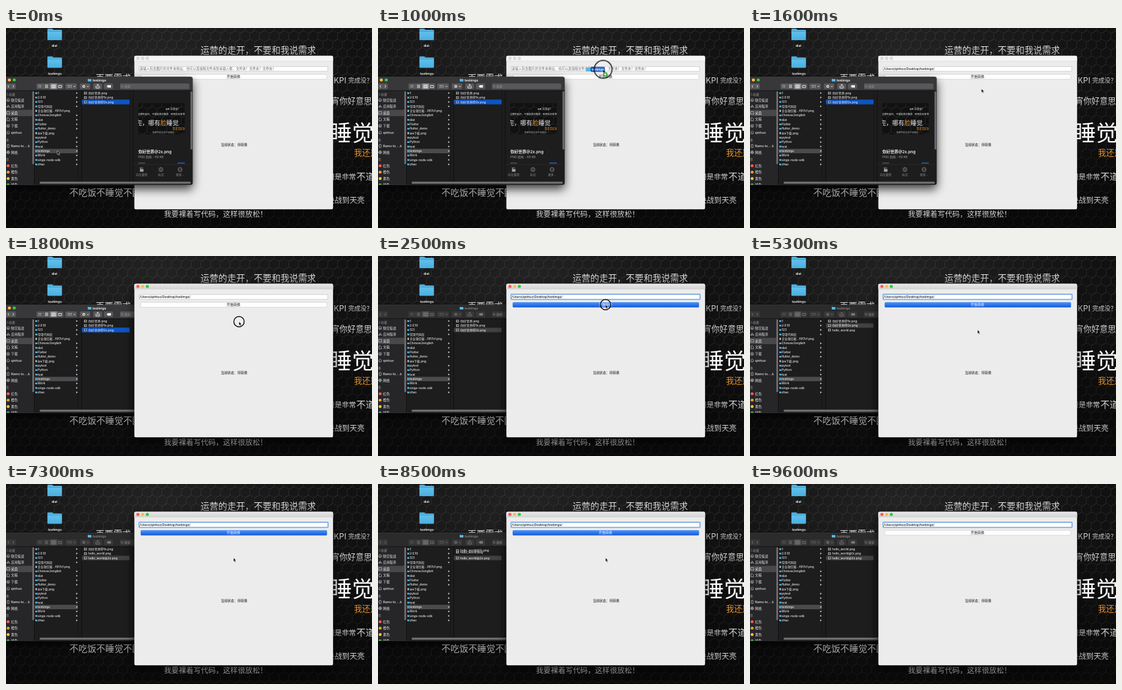
Recreate the animation shown at these times as an HTML page. Size 600x329 px, loop 10000 ms.

```html
<!DOCTYPE html>
<html lang="zh-CN">
<head>
<meta charset="utf-8">
<title>Rename tool demo</title>
<style>
html, body { margin: 0; width: 100%; height: 100%; overflow: hidden; background: #0a0a0a; }
#stage { position: absolute; left: 0; top: 0; width: 600px; height: 329px; overflow: hidden; }
#stage > svg { position: absolute; left: 0; top: 0; width: 600px; height: 329px; }
text { font-family: Inter, "Noto Sans CJK SC", "Noto Sans CJK", sans-serif; white-space: pre; }
#wall text { fill: url(#steel); font-weight: 350; }
#slogans text { font-family: "Noto Sans CJK TC", "Noto Sans CJK", sans-serif; }
#wall .amber { fill: #e0902a; }
#wall .lit { fill: #fff; }
#desk text { font-size: 5.3px; text-anchor: middle; }
#wall #desk text { fill: #fff; font-weight: 600; }
#finder { z-index: 2; }
#finder text { fill: #ececec; font-size: 5px; font-weight: 500; }
#finder .soft { fill: #8f8f91; }
#app { z-index: 1; }
#app text { font-size: 5.45px; font-weight: 500; fill: #111; }
#app .hint { fill: #666; }
#app .white { fill: #fff; }
#pointer { z-index: 5; }
.mid { text-anchor: middle; }
.deep { filter: drop-shadow(0 7px 8px rgba(0, 0, 0, .75)); }

/* hard switches */
#app, .till12, .from12, .till19, .from17, .from19, .busy, .drag, .ring,
.was42, .now42, .was62, .now62, .was85, .now85 { animation: 10s step-end infinite; }
#app { animation-name: front; }
.till12 { animation-name: till12; }
.from12 { animation-name: from12; }
.from17 { animation-name: from17; }
.till19 { animation-name: till19; }
.from19 { animation-name: from19; }
.busy { animation-name: busy; }
.drag { animation-name: drag; }
.ring { animation-name: ring; }
.was42 { animation-name: was42; }
.now42 { animation-name: now42; }
.was62 { animation-name: was62; }
.now62 { animation-name: now62; }
.was85 { animation-name: was85; }
.now85 { animation-name: now85; }
@keyframes front { 0% { z-index: 1 } 17%, 100% { z-index: 3 } }
@keyframes till12 { 0% { opacity: 1 } 12%, 100% { opacity: 0 } }
@keyframes from12 { 0% { opacity: 0 } 12%, 100% { opacity: 1 } }
@keyframes from17 { 0% { opacity: 0 } 17%, 100% { opacity: 1 } }
@keyframes till19 { 0% { opacity: 1 } 19%, 100% { opacity: 0 } }
@keyframes from19 { 0% { opacity: 0 } 19%, 100% { opacity: 1 } }
@keyframes busy { 0% { opacity: 0 } 25% { opacity: 1 } 89%, 100% { opacity: 0 } }
@keyframes drag { 0% { opacity: 0 } 1% { opacity: 1 } 11%, 100% { opacity: 0 } }
@keyframes was42 { 0% { opacity: 1 } 42%, 100% { opacity: 0 } }
@keyframes now42 { 0% { opacity: 0 } 42%, 100% { opacity: 1 } }
@keyframes was62 { 0% { opacity: 1 } 62%, 100% { opacity: 0 } }
@keyframes now62 { 0% { opacity: 0 } 62%, 100% { opacity: 1 } }
@keyframes was85 { 0% { opacity: 1 } 85%, 100% { opacity: 0 } }
@keyframes now85 { 0% { opacity: 0 } 85%, 100% { opacity: 1 } }
@keyframes ring {
  0% { opacity: 0; transform: scale(1) }
  1% { opacity: 1; transform: scale(1.3) }
  2% { opacity: 1; transform: scale(1.72) }
  11% { opacity: 0; transform: scale(1) }
  17% { opacity: 1 }
  19% { opacity: 0 }
  25% { opacity: 1 }
  27%, 100% { opacity: 0; transform: scale(1) }
}

/* motion, ten steps per second */
#hand { animation: hand 10s steps(1) infinite; }
@keyframes hand {
  0% { transform: translate(84px, 202px) }
  1% { transform: translate(84px, 202px); animation-timing-function: steps(2) }
  3% { transform: translate(118px, 187px); animation-timing-function: steps(4) }
  7% { transform: translate(285px, 108px); animation-timing-function: steps(3) }
  10% { transform: translate(369px, 68px) }
  12% { transform: translate(369px, 68px); animation-timing-function: steps(5) }
  17% { transform: translate(382px, 108px) }
  19% { transform: translate(382px, 108px); animation-timing-function: steps(4) }
  23% { transform: translate(373px, 80px) }
  28% { transform: translate(373px, 80px); animation-timing-function: steps(5) }
  33% { transform: translate(373px, 121.5px) }
  88% { transform: translate(373px, 121.5px); animation-timing-function: steps(8) }
  96%, 100% { transform: translate(402px, 340px) }
}
#fileA, #fileB, #fileC { animation: 10s steps(3) infinite; }
#fileA { animation-name: fileA; }
#fileB { animation-name: fileB; }
#fileC { animation-name: fileC; }
@keyframes fileA {
  0%, 41% { transform: translateY(0) }
  44%, 61% { transform: translateY(14.66px) }
  64%, 84% { transform: translateY(7.33px) }
  87%, 100% { transform: translateY(0) }
}
@keyframes fileB {
  0%, 41% { transform: translateY(7.33px) }
  44%, 84% { transform: translateY(0) }
  87%, 100% { transform: translateY(7.33px) }
}
@keyframes fileC {
  0%, 41% { transform: translateY(14.66px) }
  44%, 61% { transform: translateY(7.33px) }
  64%, 100% { transform: translateY(14.66px) }
}
</style>
</head>
<body>
<div id="stage">

<svg id="wall" viewBox="0 0 600 329">
  <defs>
    <path id="comb" d="M8 0V4.6L0 9.2V18.5L8 23.1V27.7M8 4.6L16 9.2V18.5L8 23.1" fill="none"/>
    <pattern id="mesh" width="16" height="27.7" patternUnits="userSpaceOnUse">
      <rect width="16" height="27.7" fill="#111112"/>
      <use href="#comb" stroke="#2b2b2c" stroke-width="1.5"/>
      <use href="#comb" stroke="#050505" stroke-width=".8" transform="translate(.7 .8)"/>
    </pattern>
    <linearGradient id="steel" x2="0" y2="1"><stop offset=".2" stop-color="#eee"/><stop offset="1" stop-color="#a0a0a0"/></linearGradient>
    <linearGradient id="shade" x2="0" y2="1"><stop offset=".3" stop-color="#000" stop-opacity="0"/><stop offset="1" stop-color="#000" stop-opacity=".5"/></linearGradient>
    <radialGradient id="glow" gradientUnits="userSpaceOnUse" cx="250" cy="30" r="330"><stop stop-color="#777" stop-opacity=".17"/><stop offset="1" stop-color="#777" stop-opacity="0"/></radialGradient>
    <linearGradient id="folder" x2="0" y2="1"><stop stop-color="#3f9fd0"/><stop offset=".25" stop-color="#62c1ec"/><stop offset="1" stop-color="#4aaede"/></linearGradient>
    <symbol id="dir" viewBox="0 0 24 20"><path d="M0 2Q0 .5 1.5 .5H8L10 2.5H22.5Q24 2.5 24 4V18Q24 19.5 22.5 19.5H1.5Q0 19.5 0 18Z" fill="url(#folder)"/><path d="M0 5.2H24" stroke="#2f87b8" stroke-width=".7"/></symbol>
  </defs>
  <rect width="600" height="329" fill="url(#mesh)"/>
  <rect width="600" height="329" fill="url(#glow)"/>
  <rect width="600" height="329" fill="url(#shade)"/>
  <g id="slogans"></g>
  <g id="desk">
    <use href="#dir" x="67.5" y="0.5" width="24.5" height="20"/><text x="79.5" y="31">dist</text>
    <use href="#dir" x="67.5" y="46" width="24.5" height="20"/><text x="80" y="76.5">testimgs</text>
  </g>
</svg>

<svg id="finder" viewBox="0 0 600 329">
  <defs>
    <path id="shell" d="M-5 80.5H302.5Q306 80.5 306 84V254.5Q306 258 302.5 258H-5Z"/>
    <clipPath id="frame"><use href="#shell"/></clipPath>
    <clipPath id="thumb"><rect x="217" y="123.5" width="76" height="51.5"/></clipPath>
  </defs>
  <use href="#shell" class="deep" fill="#1d1d1e"/>
  <g clip-path="url(#frame)">
    <rect y="80" width="307" height="23" fill="#2b2b2c"/>
    <rect class="till19" y="80" width="307" height="23" fill="#38383a"/>
    <rect y="103" width="46.5" height="156" fill="#262628"/>
    <path d="M118.5 103V253M203 103V253" stroke="#0f0f10" stroke-width=".5"/>
    <path d="M0 103H307M46.5 103V259M124 103V259M208.5 103V259" stroke="#0b0b0b" stroke-width=".7"/>
    <g class="till19"><circle cx="5.5" cy="85.5" r="2.5" fill="#fdbc40"/><circle cx="13.5" cy="85.5" r="2.5" fill="#34c84a"/></g>
    <use href="#dir" x="134" y="83.3" width="6" height="5"/>
    <text x="142" y="87.8" class="soft" style="font-size:5.4px">testimgs</text>
    <text x="142" y="87.8" class="till19" style="font-size:5.4px">testimgs</text>
    <g id="tools"></g>
    <rect y="134.5" width="43" height="10.5" fill="#48484a"/>
    <g id="places"></g>
    <rect x="47" y="198.7" width="71" height="7.3" fill="#4b4b4d"/>
    <g id="dirs"></g>
    <g id="files"></g>
    <g fill="#6f6f71">
      <rect x="43.2" y="104" width="3" height="120" rx="1.5"/>
      <rect x="302.5" y="104" width="3" height="96" rx="1.5"/>
      <rect x="55" y="252.8" width="248" height="3.4" rx="1.7"/>
    </g>
    <g id="preview">
      <g clip-path="url(#thumb)">
        <rect x="217" y="123" width="76" height="52" fill="url(#mesh)"/>
        <text x="262" y="134.5" style="font-size:4px">KPI 完成没？</text>
        <text x="216" y="142.5" style="font-size:3.9px">运营的走开，不要和我说需求</text>
        <text x="270" y="142.5" style="font-size:3.9px">夜宵你好意思</text>
        <text x="213" y="159.5" style="font-size:10px">完，哪有<tspan fill="#e0902a">脸</tspan>睡觉</text>
        <text x="273" y="166.5" style="font-size:4.2px;fill:#e0902a">我还是起来吧</text>
        <text x="240" y="173" style="font-size:3.6px;fill:#aaa">熬夜而是非常不道德的</text>
      </g>
      <text x="217" y="205.5" style="font-size:6.5px;font-weight:600">你好世界@2x.png</text>
      <text x="217" y="213.8" class="soft">PNG 图像 - 89 KB</text>
      <path d="M217 222.3H228" stroke="#555" stroke-width="1.5"/><path d="M281 222.3H293" stroke="#2469c4" stroke-width="1.5"/>
      <path d="M209 224.5H302" stroke="#333" stroke-width=".6"/>
      <g fill="none" stroke="#a5a5a7" stroke-width=".8">
        <rect x="220" y="232.5" width="5" height="3.5" fill="#a5a5a7"/><path d="M220 231Q222 229 225 230.5M220 229V231.2H222"/>
        <circle cx="254" cy="232.8" r="3.2"/><path d="M254 231V234.5"/>
        <circle cx="285.3" cy="232.8" r="3.2"/><path d="M283.5 232.8H287.2" stroke-dasharray=".9 .5"/>
      </g>
      <g class="mid">
        <text x="222.5" y="242.5" style="font-size:4.7px" class="soft">向左旋转</text>
        <text x="254" y="242.5" style="font-size:4.7px" class="soft">标记</text>
        <text x="285.5" y="242.5" style="font-size:4.7px" class="soft">更多...</text>
      </g>
    </g>
  </g>
  <use href="#shell" fill="none" stroke="#48484a" stroke-width=".5"/>
</svg>

<svg id="app" viewBox="0 0 600 329">
  <defs>
    <linearGradient id="bar" x2="0" y2="1"><stop stop-color="#e9e9e9"/><stop offset="1" stop-color="#d3d3d3"/></linearGradient>
    <linearGradient id="blue" x2="0" y2="1"><stop stop-color="#4f96f6"/><stop offset="1" stop-color="#0f57e0"/></linearGradient>
    <path id="top" d="M210.4 54.5V48Q210.4 45.7 212.6 45.7H534Q536.2 45.7 536.2 48V54.5Z"/>
    <rect id="pane" x="210.4" y="45.7" width="325.8" height="252.5" rx="2.2"/>
  </defs>
  <use href="#pane" class="from17"/>
  <g class="from17"><use href="#pane" class="deep"/></g>
  <use href="#pane" fill="#ececec"/>
  <use href="#top" fill="#f5f5f5"/>
  <g fill="#dadada" stroke="#c8c8c8" stroke-width=".4"><circle cx="216.3" cy="50" r="2.5"/><circle cx="224" cy="50" r="2.5"/><circle cx="231.7" cy="50" r="2.5"/></g>
  <g class="from17">
    <use href="#top" fill="url(#bar)"/>
    <circle cx="216.3" cy="50" r="2.6" fill="#fc5b57"/><circle cx="224" cy="50" r="2.6" fill="#fdbc40"/><circle cx="231.7" cy="50" r="2.6" fill="#34c84a"/>
  </g>
  <path d="M210.4 54.5H536.2" stroke="#cfcfcf" stroke-width=".5"/>
  <rect x="218.5" y="63.3" width="309" height="7.8" fill="#fff" stroke="#b9b9b9" stroke-width=".6"/>
  <rect class="from19" x="218.2" y="62.8" width="309.8" height="8.6" rx=".8" fill="none" stroke="#6ca4ee" stroke-width="1.5"/>
  <text class="till12 hint" x="219.3" y="69.3">请输入包含图片的文件夹地址，也可以直接拖文件夹到本输入框，文件夹！文件夹！文件夹！</text>
  <text class="from12" x="219.3" y="69.1" style="font-size:5.2px">/Users/qinhuo/Desktop/testimgs/</text>
  <rect x="221" y="76.2" width="305" height="8" rx="1.4" fill="#fff" stroke="#c4c4c4" stroke-width=".6"/>
  <text class="mid" x="373" y="82.3">开始转换</text>
  <g class="busy">
    <rect x="220.8" y="76" width="305.4" height="8.5" rx="1.5" fill="url(#blue)"/>
    <text class="mid white" x="373" y="82.3">开始转换</text>
  </g>
  <text class="mid" x="374" y="193.8">当前状态：待转换</text>
</svg>

<svg id="pointer" viewBox="0 0 600 329">
  <g id="hand">
    <g class="drag">
      <use href="#dir" x="-28" y="-3.5" width="8" height="7"/>
      <rect x="-20.5" y="-4.3" width="23.5" height="8.6" rx="2" fill="#1557c8"/>
      <text x="-8.8" y="1.8" class="mid" fill="#fff" font-size="4.7" font-weight="600">testimgs</text>
    </g>
    <circle class="ring" r="8.5" fill="#fff" fill-opacity=".12" stroke="#0a0a0a" stroke-width="1.5" vector-effect="non-scaling-stroke"/>
    <g class="drag">
      <circle cx="3.5" cy="8.3" r="3.8" fill="#35b83f"/><path d="M1.5 8.3H5.5M3.5 6.3V10.3" stroke="#fff"/>
    </g>
    <path d="M0 0V6.2L1.4 4.9L2.5 7.3L3.6 6.8L2.5 4.5H4.4Z" stroke="#fff" stroke-width=".5"/>
  </g>
</svg>
</div>

<script>
const fill = (id, html) => { document.getElementById(id).innerHTML = html; };
const label = (x, y, s, size, cls = '') =>
  `<text x="${x}" y="${y}" class="${cls}" style="font-size:${size}px">${s}</text>`;

fill('slogans', [
  [319, 42.3, '运营的走开，不要和我说需求', 14.55],
  [147, 87.5, '再要需求', 14.5],
  [537, 90.7, 'KPI', 13.5],
  [561, 90, '完成没？', 10],
  [533, 124.6, '宵你好意思', 13.4],
  [531, 186, '睡觉', 36, 'lit'],
  [570.5, 209.6, '我还是', 13.3, 'amber'],
  [527, 248.5, '而是非常', 11.7],
  [574.5, 249.5, '不道', 15],
  [526, 287.8, '决战到天亮', 12.4],
  [104, 276.3, '不吃饭不睡觉不困', 14.7],
  [259, 311, '我要裸着写代码，这样很放松！', 12.1]
].map(a => label(...a)).join(''));

// toolbar: grey boxes, then glyphs, bright while the window is active
const box = (x, w) => `<rect x="${x}" y="91.2" width="${w}" height="9.3" rx="1.5"/>`;
const boxes = [[-2, 18], [50, 44], [97, 19], [121, 17], [143, 14.5], [160.5, 15]].map(b => box(...b)).join('');
const glyphs = `<path d="M5 94L3 96L5 98M11 94L13 96L11 98
  M53.5 94.5H55M56 94.5H57.5M53.5 97H55M56 97H57.5M64 94H69M64 96H69M64 98H69
  M75 94H81V98.3H75ZM77 94V98.3M79 94V98.3M86 94.5H91V98H86Z
  M101 94.5H102.5M103.5 94.5H105M106 94.5H107.5M101 97H102.5M103.5 97H105M106 97H107.5
  M111 95.5L112.2 97L113.5 95.5M133 95.5L134.2 97L135.5 95.5
  M148.5 95.5H147.5V99H153V95.5H152M150.3 97.5V92.5L148.8 94M150.3 92.5L151.8 94"/>
  <circle cx="127.5" cy="96" r="1.7" stroke-width="1.2"/>`;
const tools = (bg, on, ink) => `<g fill="${bg}">${boxes}${box(187, 113.5)}</g>
  <rect x="72.5" y="91.2" width="11" height="9.3" fill="${on}"/>
  <g fill="none" stroke="${ink}" stroke-width=".9">${glyphs}</g>
  <path d="M165 96L167 94H172V98H167Z" fill="${ink}"/>
  <path d="M191 96.5L192.2 97.7M191.3 95.5A1.3 1.3 0 1 1 191.2 95.2" fill="none" stroke="#999" stroke-width=".6"/>`;
fill('tools', tools('#383839', '#555', '#77777a') +
  `<g class="till19">${tools('#58585a', '#8c8c8e', '#f0f0f0')}</g>` +
  label(194, 97.8, '搜索', 5, 'soft'));

// sidebar
const glyph = {
  ring: y => `<circle cx="3.5" cy="${y}" r="2.3"/><path d="M2.5 ${y + 2}L3.5 ${y}L4.5 ${y + 2}"/>`,
  tri: y => `<path d="M1.2 ${y + 2}L3.5 ${y - 2.3}L5.8 ${y + 2}M1 ${y + .8}H6"/>`,
  desk: y => `<rect x="1" y="${y - 2}" width="5" height="4"/>`,
  doc: y => `<path d="M1.7 ${y - 2.5}H4.2L5.5 ${y - 1}V${y + 2.5}H1.7Z"/>`,
  down: y => `<circle cx="3.5" cy="${y}" r="2.4"/><path d="M3.5 ${y - 1.3}V${y + 1.2}M2.5 ${y + .2}L3.5 ${y + 1.2}L4.5 ${y + .2}"/>`,
  home: y => `<path d="M1 ${y}L3.5 ${y - 2.4}L6 ${y}M1.8 ${y}V${y + 2.3}H5.2V${y}"/>`,
  phone: y => `<rect x="2" y="${y - 2.6}" width="3" height="5.2" rx=".5"/>`,
  net: y => `<circle cx="3.5" cy="${y}" r="2.4"/><path d="M1 ${y}H6M3.5 ${y - 2.4}V${y + 2.4}"/>`
};
const places = [
  ['隔空投送', 118.5, 'ring'], ['应用程序', 129, 'tri'], ['桌面', 139.7, 'desk'], ['文稿', 150.3, 'doc'],
  ['下载', 161, 'down'], ['qinhuo', 171.7, 'home'], ['Ramo to...', 194, 'phone'], ['网络', 204.5, 'net']
];
const tags = [['红色', '#fc5b57'], ['橙色', '#fd9a38'], ['黄色', '#fccb3a'], ['绿色', '#48cf57']];
fill('places',
  [['个人收藏', 111], ['设备', 185.5], ['标签', 218]].map(([s, y]) => label(-4.5, y, s, 4.8, 'soft')).join('') +
  places.map(([s, y, g]) => label(8.3, y + 2, s, 5.4) +
    `<g fill="none" stroke="#d0d0d2" stroke-width=".7">${glyph[g](y)}</g>`).join('') +
  '<path d="M35.5 194.5L37.2 192L39 194.5ZM35.5 195.3H39V196H35.5Z" fill="#aaa"/>' +
  tags.map(([s, c], i) => {
    const y = 226.7 + i * 10.5;
    return `<circle cx="3.5" cy="${y}" r="2.4" fill="${c}"/>` + label(8.3, y + 2, s, 5.4);
  }).join(''));

// folder column
const dirs = ['1', '2.0.10', '123', '常用代码段', '企业微信截...f917cf.png', 'Chinese2english', 'dist', 'Flutter',
  'flutter_demo', 'ipa下载.png', 'pytest', 'Python', 'test', 'testimgs', 'Work', 'xinge-node-sdk', 'zhao'];
fill('dirs', dirs.map((s, i) => {
  const y = 107 + i * 7.33;
  return label(52, y + 1.8, s, 4.85) + (s.endsWith('.png')
    ? `<rect x="48.5" y="${y - 1.7}" width="2" height="3.4" fill="#ddd"/>`
    : `<use href="#dir" x="48" y="${y - 2}" width="3.6" height="4"/><path d="M115 ${y - 1.6}L118 ${y}L115 ${y + 1.6}Z" fill="#b8b8ba"/>`);
}).join(''));

// file column: each entry swaps its name once
const sheet = '<rect x="128" y="105" width="4.4" height="4" fill="#e9e9e9"/><rect x="128.6" y="105.6" width="3.2" height="2.6" fill="#333"/>';
const file = (id, end, at, under = '') => `<g id="file${id}">${under}${sheet}` +
  label(135, 108.9, `你好世界${end}.png`, 5, 'was' + at) + label(135, 108.9, `hello_world${end}.png`, 4.9, 'now' + at) + '</g>';
const pick = (c, cls) => `<rect class="${cls}" x="124.5" y="103.4" width="78" height="7.3" fill="${c}"/>`;
fill('files', file('C', '@2x', 62, pick('#424244', '') + pick('#0b55cc', 'till19')) +
  file('A', '', 42) + file('B', '@1x', 85));
</script>
</body>
</html>
```
